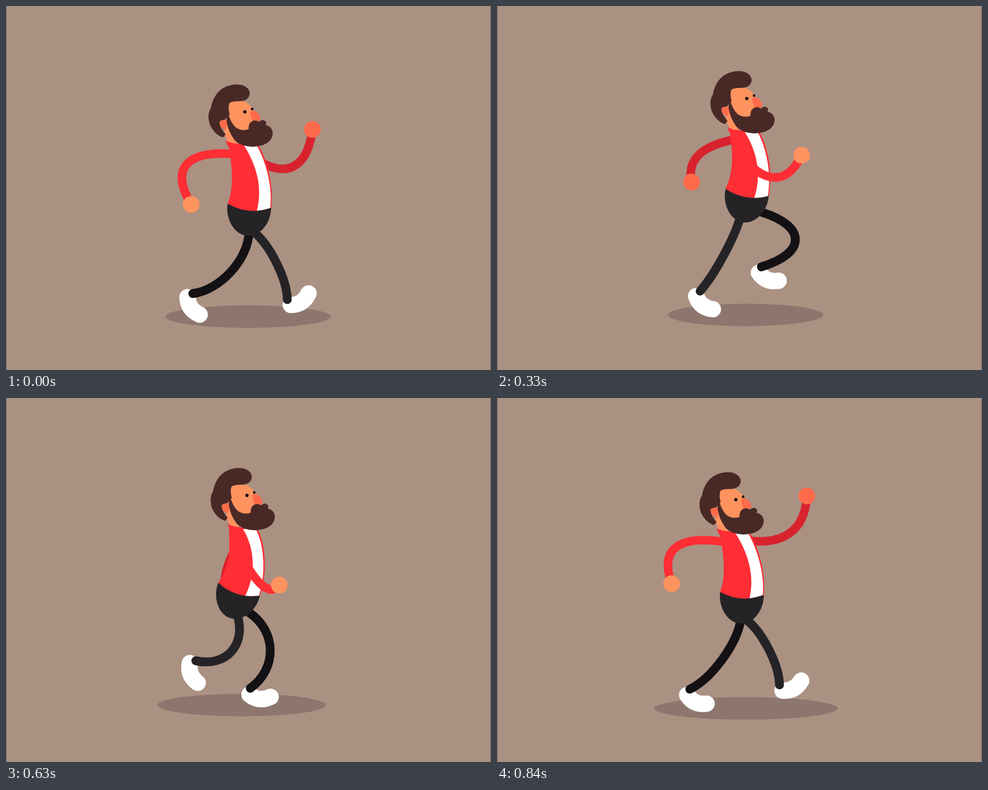
An HTML page with a canvas for the animation above (0.87 s loop, 800 by 600 pixels).

```html
<!DOCTYPE html>
<html lang="en">
<head>
<meta charset="utf-8">
<title>Walk cycle</title>
<style>
  html, body { margin: 0; width: 100%; height: 100%; overflow: hidden; background: #aa9182; }
  canvas { display: block; width: 800px; height: 600px; }
</style>
</head>
<body>
<canvas id="stage" width="800" height="600"></canvas>
<script>
const ctx = document.getElementById('stage').getContext('2d');
const LOOP = 870, STEP = 30;

const C = {
  ground: '#aa9182', edge: '#75656a', shadow: '#8d766d',
  red: '#ff2d34', darkRed: '#d8232f', white: '#fff',
  skin: '#ff935f', blush: '#ff6b4a', hair: '#482926',
  pants: '#252326', darkPants: '#131114', eye: '#140c0c'
};

// Key poses; every row starts with its time.
// body offset x, y, lean, shadow left, right
const BODY = [
  [0, 0, 0, 5, 263, 536], [105, 6, 11, 11, 251, 520], [210, 15, -11.5, 18, 279, 512],
  [330, 18, -22, 9, 282, 538], [450, -8.5, -2, 3, 263, 559], [570, 4.5, 12, 12, 249, 520],
  [690, 2, -40, 20, 252, 540], [840, 0, -7, 3.5, 259, 562]
];
// elbow, hand
const [NEAR_ARM, FAR_ARM] = sides([
  [0, 299, 260, 305.5, 327], [210, 416, 305, 468, 352.5], [330, 444, 280, 502.5, 246],
  [450, 438, 263, 484, 215], [570, 430, 306, 470.5, 257], [690, 385, 282, 416.5, 345.5],
  [840, 298, 244, 288, 306]
], [
  [0, 463, 268, 505.5, 203.5], [210, 359, 270, 376, 325], [330, 342, 238, 321, 290],
  [450, 314, 241, 286, 290], [570, 341, 284, 321, 344], [690, 394, 281, 433, 317.5],
  [840, 472, 229, 511, 161.5]
]);
// ankle, knee bend, foot angle
const [NEAR_LEG, FAR_LEG] = sides([
  [0, 464, 484, 11, -33], [210, 409, 488, 6, 8], [330, 335, 470, 6, 38],
  [450, 312, 470, 22, 53], [570, 290, 461, 29, 61], [690, 358, 409, 38, 73],
  [840, 466, 473, 11, -28]
], [
  [0, 308, 474, 22, 55], [210, 333, 431, 52, 73], [330, 436, 430, 56, 22],
  [450, 488, 487, 17.5, -41], [570, 432, 479, 45, 0], [690, 373, 478, 17.5, 12],
  [840, 318, 480, 14, 24]
]);

// The stride repeats on the other side, about half a loop away.
function sides(near, far) {
  const join = (own, other) => {
    const echo = (from, to) => [to, ...other.find(r => r[0] === from).slice(1)];
    return [...own, echo(570, 105), echo(330, 765)].sort((a, b) => a[0] - b[0]);
  };
  return [join(near, far), join(far, near)];
}

const HEAD = {
  neck: 'M360 195 L374 195 L382 232 L368 229 L361 213 Z',
  face: 'M366 160 Q380 154 392 157 Q404 162 409 174 L416 186 L404 208 H384 L364 190 Z',
  hair: `M362 211 Q360 217 356 216 Q343 211 336 195 Q331 178 338 168 Q342 146 357 136
    Q372 127 388 130 Q402 134 402 145 Q400 157 384 157 Q368 157 368 162 Q366 168 369 179
    L366 181 Q364 188 354 189 Q351 195 356 203 Q359 208 362 211 Z`,
  ear: 'M352 191 Q356 187 366 188 L363 204 Q352 202 352 191 Z',
  nose: 'M403 174 Q403 181 407 190 Q413 193 418 189 Q422 183 415 176 Q409 170 403 174 Z',
  beard: `M366 176 Q371 194 380 201 Q390 207 400 203 Q400 191 408 189 Q413 188 417 191
    Q424 185 429 191 Q430 194 428 196 Q440 199 440 211 Q437 231 406 232 Q386 231 377 221
    Q366 206 364 190 Q364 182 366 176 Z`
};
for (const k in HEAD) HEAD[k] = new Path2D(HEAD[k]);

// Smooth periodic interpolation that never overshoots a pose.
function pose(rows, t) {
  const n = rows.length;
  const at = i => rows[(i + n) % n][0] + Math.floor(i / n) * LOOP;
  let i = n - 1;
  while (at(i) > t) i--;
  const h = at(i + 1) - at(i), u = (t - at(i)) / h;
  return rows[0].slice(1).map((_, k) => {
    const v = j => rows[(j + n) % n][k + 1];
    const slope = j => (v(j + 1) - v(j)) / (at(j + 1) - at(j));
    const tangent = j => {
      const a = slope(j - 1), b = slope(j);
      return a * b <= 0 ? 0 : 2 * a * b / (a + b);
    };
    const w = u * u * (3 - 2 * u);
    return v(i) + (v(i + 1) - v(i)) * w
      + h * u * (1 - u) * ((1 - u) * tangent(i) - u * tangent(i + 1));
  });
}

// Local frame: turns (x, y) by an angle about an origin.
function frame(ox, oy, deg) {
  const a = deg * Math.PI / 180, cos = Math.cos(a), sin = Math.sin(a);
  return (x, y) => [ox + x * cos - y * sin, oy + x * sin + y * cos];
}

function fill(color, path) {
  ctx.fillStyle = color;
  path ? ctx.fill(path) : ctx.fill();
}

function ellipse(x, y, rx, ry, color) {
  ctx.beginPath();
  ctx.ellipse(x, y, rx, ry, 0, 0, 7);
  fill(color);
}

function stroke(width, color) {
  ctx.lineWidth = width;
  ctx.strokeStyle = color;
  ctx.stroke();
}

// Rubber hose from (x, y) to (ex, ey) whose middle is (mx, my).
function hose(width, color, x, y, mx, my, ex, ey, twist) {
  const px = (8 * mx - x - ex) / 6, py = (8 * my - y - ey) / 6;
  const qx = (ex - x) / 4, qy = (ey - y) / 4 + (ex - x) * twist;
  ctx.beginPath();
  ctx.moveTo(x, y);
  ctx.bezierCurveTo(px - qx, py - qy, px + qx, py + qy, ex, ey);
  stroke(width, color);
}

function shoe(x, y, deg) {
  const foot = frame(x, y, deg);
  ctx.beginPath();
  ctx.moveTo(...foot(0, 10.5));
  ctx.quadraticCurveTo(...foot(17, 21.5), ...foot(35, 10.5));
  stroke(27, C.white);
}

function leg(rows, hx, hy, side, color, t) {
  const [x, y, bend, deg] = pose(rows, t);
  const off = 0.12 * (x - hx) + 0.3 * bend + side;
  const sx = hx + off, sy = hy + 44 - 0.02 * off * off;
  const k = bend / Math.hypot(x - sx, y - sy);
  shoe(x, y, deg);
  hose(14.5, color, sx, sy, (sx + x) / 2 + (y - sy) * k, (sy + y) / 2 - (x - sx) * k, x, y, 0);
}

function arm(rows, x, y, sleeve, hand, t) {
  const [mx, my, ex, ey] = pose(rows, t);
  hose(14, sleeve, x, y, mx, my, ex, ey, 0.11);
  ellipse(ex, ey, 13.8, 13.8, hand);
}

function torso(dx, dy, hip, lean) {
  const neckL = dx + 371 - 0.4 * lean, neckR = dx + 419 - 0.45 * lean;
  const top = dy + 230;

  ctx.beginPath();
  ctx.moveTo(...hip(-36, 0));
  ctx.bezierCurveTo(...hip(-38, 26), ...hip(-20, 50), ...hip(0, 50));
  ctx.bezierCurveTo(...hip(20, 50), ...hip(38, 28), ...hip(36, 0));
  fill(C.pants);

  ctx.beginPath();
  ctx.moveTo(dx + 362, dy + 222);
  ctx.lineTo(dx + 374, dy + 226);
  ctx.lineTo(neckR, top);
  ctx.bezierCurveTo(neckR + 15, top + 26, ...hip(38, -33), ...hip(36, 0));
  ctx.quadraticCurveTo(...hip(0, 17), ...hip(-36, 0));
  ctx.bezierCurveTo(...hip(-27, -30), neckL + 3, top + 38, neckL, top + 6);
  ctx.quadraticCurveTo(dx + 367, dy + 234, dx + 362, dy + 222);
  fill(C.red);

  ctx.beginPath();
  ctx.moveTo(neckR - 24, top);
  ctx.lineTo(neckR - 3, top);
  ctx.bezierCurveTo(neckR + 12, top + 26, ...hip(36, -33), ...hip(34.5, 1));
  ctx.quadraticCurveTo(...hip(25, 5), ...hip(13, 7.5));
  ctx.bezierCurveTo(...hip(20, -33), neckR - 5, top + 30, neckR - 24, top);
  fill(C.white);
}

function head() {
  fill(C.skin, HEAD.face);
  fill(C.hair, HEAD.hair);
  fill(C.blush, HEAD.ear);
  fill(C.blush, HEAD.nose);
  fill(C.hair, HEAD.beard);
  ellipse(394, 174.5, 2.7, 2.7, C.eye);
  ellipse(406, 169.8, 2.1, 2.3, C.eye);
}

function shifted(dx, dy, paint) {
  ctx.save();
  ctx.translate(dx, dy);
  paint();
  ctx.restore();
}

function draw(t) {
  ctx.fillStyle = C.ground;
  ctx.fillRect(0, 0, 800, 600);
  ctx.fillStyle = C.edge;
  ctx.fillRect(0, 0, 1, 600);
  ctx.fillRect(799, 0, 1, 600);
  ctx.lineCap = 'round';

  const [dx, dy, lean, left, right] = pose(BODY, t);
  const hx = dx + 410 - 1.7 * lean, hy = dy + 329;
  const ground = 509 + 3 * Math.cos(4 * Math.PI * t / LOOP);
  ellipse((left + right) / 2, ground, (right - left) / 2, 18.5, C.shadow);

  arm(FAR_ARM, dx + 395, dy + 238, C.darkRed, C.blush, t);
  leg(FAR_LEG, hx, hy, 4, C.darkPants, t);
  leg(NEAR_LEG, hx, hy, -4, C.pants, t);
  shifted(dx, dy, () => fill(C.skin, HEAD.neck));
  torso(dx, dy, frame(hx, hy, lean), lean);
  arm(NEAR_ARM, dx + 374, dy + 244, C.red, C.skin, t);
  shifted(dx, dy, head);
}

function tick() {
  const t = performance.now() % LOOP;
  draw(Math.floor(t / STEP) * STEP);
  requestAnimationFrame(tick);
}
tick();
</script>
</body>
</html>
```
